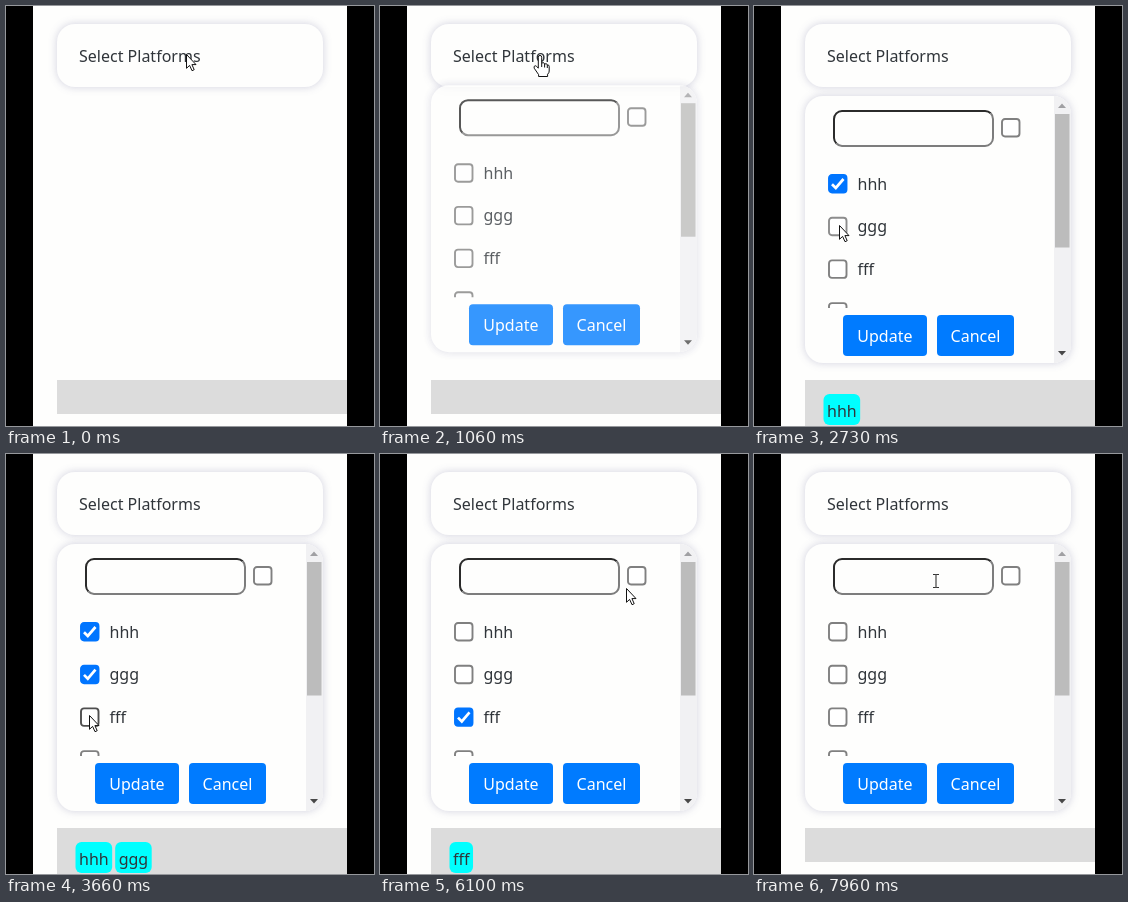
An HTML page that plays this animation: 368x420 px, repeating every 8000 ms.

```html
<!DOCTYPE html>
<html lang="en">
<head>
<meta charset="utf-8">
<title>Platform picker</title>
<style>
  html, body { margin: 0; width: 100%; height: 100%; overflow: hidden; background: #000; }
  svg { display: block; width: 100%; height: 100%; }
  text { font: 16px "Noto Sans", "Open Sans", sans-serif; fill: #30353a; white-space: pre; }
  .card { fill: #fefefd; filter: drop-shadow(0 0 4px rgba(45, 45, 110, .22)); }
  .button { fill: #007bff; }
  .button + text { fill: #fff; }
  .tick { fill: none; stroke: #fff; stroke-width: 2.7; }
  .cursor { fill: #fff; stroke: #111; stroke-width: 1; stroke-linejoin: round; }
</style>
</head>
<body>
<svg viewBox="0 0 368 420">
  <defs>
    <clipPath id="listClip"><rect x="51" y="150" width="249" height="152"/></clipPath>
    <clipPath id="panelClip"><rect x="51" y="90" width="266" height="267" rx="18"/></clipPath>
  </defs>
  <rect width="368" height="420"/>
  <rect x="27" width="314" height="420" fill="#fefefd"/>
  <rect id="bar" x="51" y="374" width="290" height="34" fill="#dcdcdc"/>
  <g id="chips"></g>

  <rect class="card" x="51" y="18" width="266" height="63" rx="18"/>
  <text x="73" y="56">Select Platforms</text>

  <g id="panel">
    <rect class="card" x="51" y="90" width="266" height="267" rx="18"/>
    <g clip-path="url(#panelClip)">
      <rect x="300" y="90" width="17" height="267" fill="#f1f1f3"/>
      <rect x="301" y="108" width="14.5" height="133.5" fill="#bcbcbc"/>
      <path d="M304 102l4-4.5 4 4.5z" fill="#a0a0a3"/>
      <path d="M304 345l4 4.5 4-4.5z" fill="#484848"/>
    </g>
    <g fill="none" stroke-width="2">
      <path d="M82.5 137.5A8 8 0 0 1 80 132V113A8 8 0 0 1 88 105H231A8 8 0 0 1 236.7 107.3" stroke="#2b2b2b"/>
      <path d="M236.7 107.3A8 8 0 0 1 239 113V132A8 8 0 0 1 231 140H88A8 8 0 0 1 82.5 137.5" stroke="#7d7d7d"/>
    </g>
    <g id="all"></g>
    <g id="list" clip-path="url(#listClip)"></g>
    <rect class="button" x="89" y="309" width="84" height="41" rx="4"/>
    <text x="103.3" y="336">Update</text>
    <rect class="button" x="183" y="309" width="77" height="41" rx="4"/>
    <text x="196.6" y="336">Cancel</text>
  </g>

  <g id="pointer">
    <path class="cursor" id="arrow" d="M.5.5V14.3L3.6 11.4 6 16.7 8.2 15.7 5.9 10.6H10z"/>
    <path class="cursor" id="hand" d="M-1.7 1.2Q-1.6-.6 0-.6T1.7 1.2V7Q4.2 5.8 4.6 8 7 6.9 7.3 9 9.2 8.6 9.2 10.5V15Q9.2 17 7.6 18.2V20.5H-1.4V18.6L-5.8 12.2Q-6.6 10.2-4.8 9.7-3.7 9.6-1.7 12.2zM1.7 7V11M4.6 8V11.5M7.3 9V12"/>
    <path id="beam" d="M-3-6.5H-.8L0-6 .8-6.5H3M0-6V6M-3 6.5H-.8L0 6 .8 6.5H3" fill="none" stroke="#333" stroke-width="1.1"/>
  </g>
</svg>
<script>
const LOOP = 8000, PRESS = 100;
const NAMES = ['hhh', 'ggg', 'fff', 'eee', 'ddd', 'ccc', 'bbb'];
const $ = id => document.getElementById(id);

// Mouse path: time, x, y
const PATH = [
  [0, 180, 48], [330, 180, 48], [430, 162, 50], [800, 162, 50], [1060, 160, 50],
  [1580, 94, 174], [1630, 94, 174], [1760, 90, 179], [2180, 90, 179], [2500, 85, 219],
  [3050, 85, 219], [3460, 84, 254], [3560, 84, 254], [3660, 83, 261], [4000, 83, 261],
  [4260, 84, 217], [4680, 84, 217], [4930, 82, 175], [5400, 82, 175], [5900, 232, 130],
  [5960, 232, 130], [6100, 246, 134], [6160, 262, 124], [7710, 262, 124], [7950, 182, 127]
];

// Mouse releases: time and the checkbox toggled
const CLICKS = [
  [2100, 'hhh'], [2830, 'ggg'], [3930, 'fff'], [4600, 'ggg'],
  [5200, 'hhh'], [6400, 'all'], [7710, 'all']
];

function add(parent, tag, attrs, text) {
  const el = document.createElementNS('http://www.w3.org/2000/svg', tag);
  for (const key in attrs) el.setAttribute(key, attrs[key]);
  if (text) el.textContent = text;
  return parent.appendChild(el);
}

function makeBox(parent, name, x, y) {
  const g = add(parent, 'g', { transform: `translate(${x} ${y})` });
  const rect = add(g, 'rect', { x: 1, y: 1, width: 17.5, height: 17.5, rx: 3, 'stroke-width': 1.9 });
  const tick = add(g, 'path', { class: 'tick', d: 'M4 10.2L7.8 14 15.5 5' });
  return { name, x, y, rect, tick };
}

const boxes = [makeBox($('all'), 'all', 247, 112)];
NAMES.slice(0, 4).forEach((name, i) => {
  const y = 168 + i * 42.7;
  boxes.push(makeBox($('list'), name, 74, y));
  add($('list'), 'text', { x: 103.5, y: y + 15.6 }, name);
});

const chips = NAMES.map(name => {
  const g = add($('chips'), 'g', {});
  const rect = add(g, 'rect', { y: 388, height: 31, rx: 6, fill: '#0ff' });
  const label = add(g, 'text', { x: 3.5, y: 411 }, name);
  const width = label.getComputedTextLength() + 7;
  rect.setAttribute('width', width);
  return { name, g, width };
});

// The CSS "ease" curve
function ease(x) {
  if (x <= 0) return 0;
  if (x >= 1) return 1;
  const bez = (a, b, s) => 3 * a * s * (1 - s) ** 2 + 3 * b * s * s * (1 - s) + s ** 3;
  let lo = 0, hi = 1;
  for (let i = 0; i < 20; i++) {
    const mid = (lo + hi) / 2;
    if (bez(.25, .25, mid) < x) lo = mid; else hi = mid;
  }
  return bez(.1, 1, lo);
}

function mouseAt(t) {
  const i = PATH.findIndex(p => p[0] > t);
  if (i < 0) return PATH[PATH.length - 1].slice(1);
  const [t0, x0, y0] = PATH[i - 1], [t1, x1, y1] = PATH[i];
  const u = (t - t0) / (t1 - t0), k = u * u * (3 - 2 * u);
  return [x0 + (x1 - x0) * k, y0 + (y1 - y0) * k];
}

function checkedAt(t) {
  const set = new Set();
  for (const [time, name] of CLICKS) {
    if (t < time) break;
    const on = !set.has(name);
    for (const n of name === 'all' ? ['all', ...NAMES] : [name]) {
      if (on) set.add(n); else set.delete(n);
    }
  }
  return set;
}

const show = (el, on) => el.setAttribute('display', on ? 'inline' : 'none');
const inside = (x, y, l, t, r, b) => x >= l && x <= r && y >= t && y <= b;

function drawBox(box, checked, mx, my, pressed) {
  const hover = inside(mx, my, box.x, box.y, box.x + 19.5, box.y + 19.5);
  const state = hover ? (pressed ? 2 : 1) : 0;
  const color = (checked ? ['#0075ff', '#005cc8', '#3793ff'] : ['#808080', '#4f4f4f', '#8d8d8d'])[state];
  box.rect.setAttribute('stroke', color);
  box.rect.setAttribute('fill', checked ? color : '#fff');
  show(box.tick, checked);
}

function render(t) {
  const open = ease((t - 820) / 500);
  $('panel').setAttribute('opacity', open);
  $('panel').setAttribute('transform', `translate(0 ${-50 * (1 - open)})`);
  show($('panel'), open > 0);

  const [x, y] = mouseAt(t);
  const checked = checkedAt(t);
  const pressed = CLICKS.some(([time]) => t >= time - PRESS && t < time);
  for (const box of boxes) drawBox(box, checked.has(box.name), x, y, pressed);

  let left = 69.5;
  for (const chip of chips) {
    const on = checked.has(chip.name);
    show(chip.g, on);
    if (!on) continue;
    chip.g.setAttribute('transform', `translate(${left} 0)`);
    left += chip.width + 3;
  }
  $('bar').setAttribute('height', checked.size ? 46 : 34);

  const hand = t > 350 && y < 82;
  const beam = open > 0 && inside(x, y, 79, 104, 240, 140);
  show($('hand'), hand);
  show($('beam'), beam);
  show($('arrow'), !hand && !beam);
  $('pointer').setAttribute('transform', `translate(${x} ${y})`);
}

function tick() {
  render(performance.now() % LOOP);
  requestAnimationFrame(tick);
}
tick();
</script>
</body>
</html>
```
